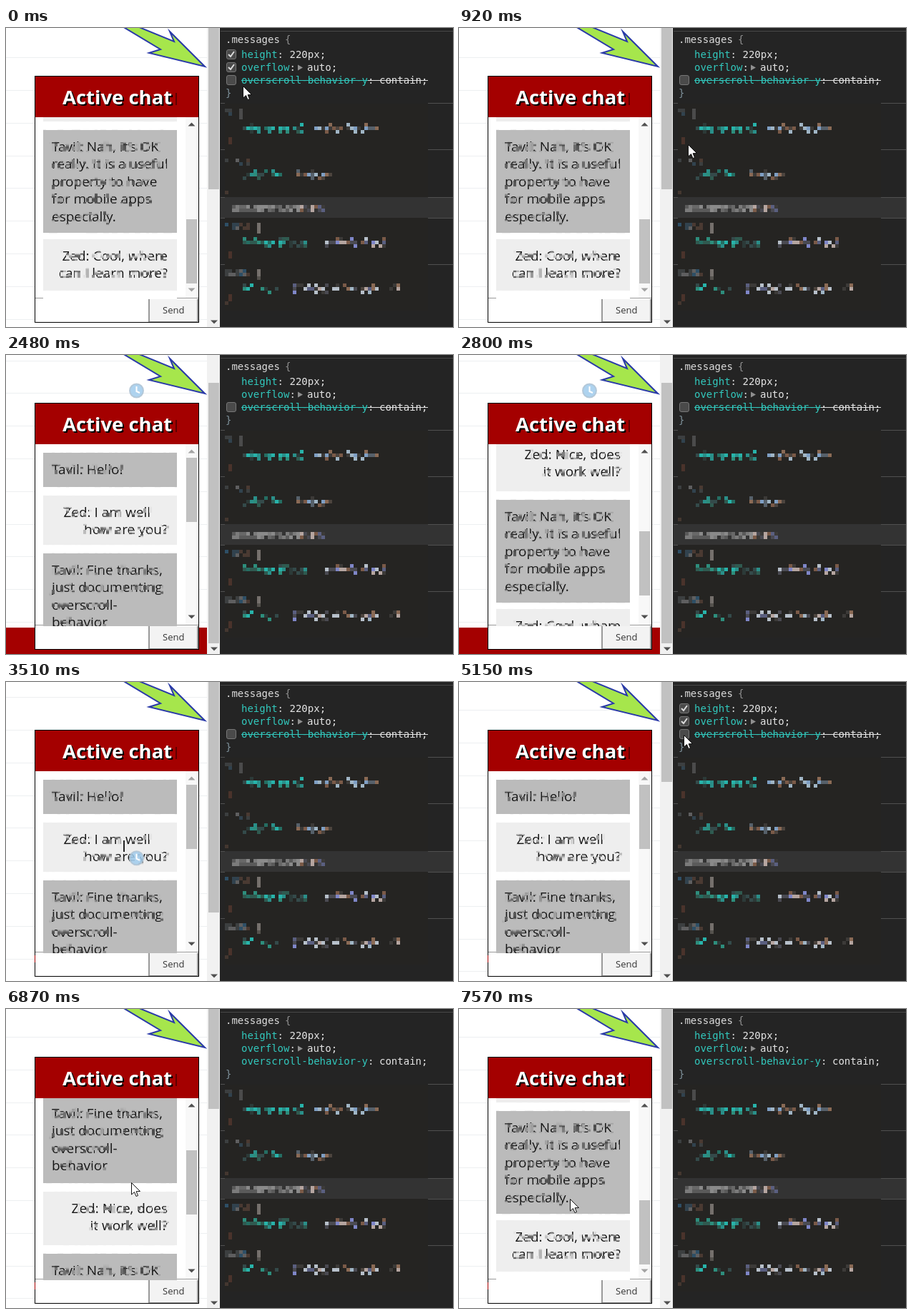
Animation of 625x419 px, one loop 8 s. Source, as an HTML page with a canvas:

```html
<!DOCTYPE html>
<html lang="en">
<head>
<meta charset="utf-8">
<title>Scroll chaining demo</title>
<style>
html, body { margin: 0; width: 100%; height: 100%; overflow: hidden; background: #fff; }
canvas { display: block; }
</style>
</head>
<body>
<canvas id="stage" width="625" height="419"></canvas>
<script>
const LOOP = 8000;
const ctx = document.getElementById('stage').getContext('2d');
const SANS = '"Open Sans", "Noto Sans", sans-serif';
const MONO = '14px "DejaVu Sans Mono", "Noto Sans Mono", monospace';
const RED = '#a40000', TEAL = '#32c8bd';

// Keyframes: [time, value, ...]
const PAGE = [[1160, 181], [1840, 581, 'out'], [3350, 581], [3670, 190], [3760, 190], [3990, 0], [5700, 0]];
const CHAT = [[1940, 355], [2480, 0], [2560, 0], [2850, 355], [2900, 355], [3200, 0], [6740, 0], [7040, 355]];
const POINTER = [
  [60, 331, 82], [230, 411, 66], [330, 411, 70], [1150, 285, 200], [1200, 280, 204],
  [1700, 161, 267], [3760, 165, 230], [4250, 353, 20], [4590, 340, 128], [4640, 340, 128],
  [5000, 316, 80], [5080, 316, 80], [5150, 314, 75], [5640, 314, 75], [5860, 446, 72],
  [6030, 378, 74], [6100, 378, 74], [6170, 330, 120], [6250, 268, 182], [6570, 179, 237],
  [6740, 179, 237], [7040, 170, 252], [7130, 170, 252], [7570, 155, 267]
];

// Chat bubbles in content coordinates: top, height, fill, side, lines
const BUBBLES = [
  [12, 48, '#bbb', 'left', ['Tavil: Hello!']],
  [72, 69, '#eee', 'right', ['Zed: I am well  ', 'how are you?']],
  [153, 121, '#bbb', 'left', ['Tavil: Fine thanks,', 'just documenting', 'overscroll-', 'behavior']],
  [286, 75, '#eee', 'right', ['Zed: Nice, does', 'it work well?']],
  [373, 144, '#bbb', 'left', ['Tavil: Nah, it\u2019s OK', 'really. It is a useful', 'property to have', 'for mobile apps', 'especially.']],
  [526, 72, '#eee', 'right', ['Zed: Cool, where', 'can I learn more?']]
];

function seeded(seed) {
  return () => {
    seed = (seed * 1664525 + 1013904223) % 4294967296;
    return seed / 4294967296;
  };
}

function layer(w, h) {
  const c = document.createElement('canvas');
  c.width = w;
  c.height = h;
  return c.getContext('2d');
}

function track(keys, t) {
  if (t <= keys[0][0]) return keys[0].slice(1);
  for (let i = 1; i < keys.length; i++) {
    const a = keys[i - 1], b = keys[i];
    if (t < b[0]) {
      let u = (t - a[0]) / (b[0] - a[0]);
      if (b[2] === 'out') u = 1 - (1 - u) ** 2;
      return b.slice(1).map((v, k) => typeof v === 'number' ? a[k + 1] + (v - a[k + 1]) * u : v);
    }
  }
  return keys[keys.length - 1].slice(1);
}

function box(x, y, w, h, fill, g = ctx) {
  g.fillStyle = fill;
  g.fillRect(x, y, w, h);
}

function label(str, x, y, fill, font, g = ctx) {
  g.font = font;
  g.fillStyle = fill;
  g.fillText(str, x, y);
}

function polygon(points, fill, stroke, width, x = 0, y = 0) {
  ctx.beginPath();
  points.forEach(([px, py]) => ctx.lineTo(x + px, y + py));
  ctx.closePath();
  ctx.fillStyle = fill;
  ctx.fill();
  if (stroke) {
    ctx.strokeStyle = stroke;
    ctx.lineWidth = width;
    ctx.stroke();
  }
}

function buildBubbles() {
  const W = 187, H = 610, CELL = 4;
  const plain = layer(W, H), squashed = layer(Math.ceil(W / CELL), H), rand = seeded(11);
  for (const [top, h, fill, side, lines] of BUBBLES) {
    box(0, top, W, h, fill, plain);
    plain.textAlign = side;
    lines.forEach((line, i) => {
      const dx = line.endsWith(' ') ? 24 : 0;
      label(line.trim(), side === 'left' ? 12 : 174 - dx, top + 30 + i * 24.4, '#161616', '19px ' + SANS, plain);
    });
  }
  // Some cells are blurred sideways into their average
  squashed.imageSmoothingQuality = 'high';
  squashed.drawImage(plain.canvas, 0, 0, W / CELL, H);
  plain.imageSmoothingEnabled = false;
  for (let y = 0; y < H; y += 6) {
    for (let x = 0; x < W; x += CELL) {
      if (rand() < 0.4) plain.drawImage(squashed.canvas, x / CELL, y, 1, 6, x, y, CELL, 6);
    }
  }
  return plain.canvas;
}

function buildPanel() {
  const g = layer(326, 419), rand = seeded(5);
  g.translate(-299, 0);
  box(299, 0, 326, 419, '#242424', g);
  box(300, 4, 325, 1, '#484848', g);
  box(306, 106, 284, 290, '#252422', g);
  box(300, 237, 325, 29, '#333333', g);
  for (const y of [105, 170, 237, 266, 331]) {
    box(300, y, 6, 1, '#505050', g);
    box(590, y, 35, 1, '#505050', g);
  }
  const teal = ['#28b3aa', '#2a8f89', '#256d62', '#2f5a50', '#2d8d7c', '#344a4a', '#2c3a38'];
  const value = ['#7f9fc4', '#a0b5c5', '#7a5a48', '#4c443e', '#8a6a55', '#56606a', '#3c3a38'];
  const mixed = ['#7f86c8', '#b5a5a0', '#5a5f80', '#b7c0ca', '#7a5a48', '#4a4a52', '#3c3a38'];
  const rule = ['#2e4f66', '#3c3f40', '#31424e', '#4a3a32', '#5f5f60'];
  const grey = ['#686868', '#7b7b7b', '#5a5a5a', '#8a8a8a'];
  const cells = (x0, x1, y, density, colors) => density.forEach((d, row) => {
    for (let x = x0; x < x1; x += 5) {
      const c = colors[Math.floor(rand() * colors.length)];
      if (rand() < d) box(x, y + row * 5, 5, 5, c, g);
    }
  });
  const PROP = [0.15, 0.7, 0.3];
  cells(306, 316, 113, [0.9, 0.3], rule);
  cells(326, 331, 113, [1, 1, 1], ['#4b4b4b', '#5f5f5f']);
  cells(331, 416, 133, PROP, teal);
  cells(431, 521, 133, PROP, value);
  cells(311, 316, 153, [1, 1], ['#4a332b']);
  cells(306, 346, 183, [0.5, 0.2], rule);
  cells(331, 386, 198, [0.3, 0.8, 0.4], teal);
  cells(406, 456, 198, PROP, value);
  cells(306, 311, 223, [0, 1], ['#443730']);
  cells(316, 411, 248, [0.85, 0.8], grey);
  cells(411, 446, 248, [0.9, 0.9], mixed);
  cells(306, 341, 273, [0.7, 0.55], rule);
  cells(351, 356, 273, [1, 1, 1], ['#55524e', '#75706c']);
  cells(331, 421, 293, [0.3, 0.8, 0.3], teal);
  cells(441, 531, 293, [0.3, 0.75, 0.3], mixed);
  cells(311, 316, 313, [1, 1], ['#4a332b']);
  cells(306, 341, 338, [0.45, 0.8], rule);
  cells(351, 356, 338, [1, 1, 1], ['#55524e', '#75706c']);
  cells(331, 381, 358, [0.1, 0.75, 0.3], teal);
  cells(401, 451, 358, [0.4, 0.85, 0.4], mixed);
  cells(456, 556, 358, [0.25, 0.75, 0.3], value.concat(mixed));
  cells(311, 316, 373, [1, 1], ['#4a332b']);
  cells(306, 311, 383, [1, 0], ['#443730']);
  return g.canvas;
}

const bubbles = buildBubbles();
const panel = buildPanel();

function caret(x, y, dir, fill) {
  polygon([[-5, -2.5 * dir], [5, -2.5 * dir], [0, 2.5 * dir]], fill, null, 0, x, y);
}

function drawPage(scroll, hover) {
  box(0, 0, 300, 419, '#fff');
  const gap = 45.8;
  for (let y = ((39 - scroll) % gap + gap) % gap; y < 419; y += gap) {
    box(0, Math.round(y), 282, 1, '#edeff1');
  }
  box(0, Math.round(963 - scroll), 282, 600, RED);
  box(281, 0, 18, 419, '#f1f1f1');
  const end = Math.round(140 + scroll / 2.1);
  box(283, end - 378, 15, 378, hover ? '#a8a8a8' : '#c1c1c1');
  box(281, 404, 18, 15, '#f1f1f1');
  caret(291, 412, 1, '#505050');
}

function drawChat(scroll, hover, t) {
  box(40, 67, 230, 346, '#000');
  box(41, 68, 228, 344, '#fff');
  box(41, 68, 228, 57, RED);
  const font = 'bold 27.5px ' + SANS;
  label('Active chat', 81, 109, '#000', font);
  label('Active chat', 80, 108, '#000', font);
  label('Active chat', 79, 107, '#fff', font);
  box(237, 91, 2, 17, '#600000');

  box(41, 378, 228, 1, '#999');
  ctx.save();
  ctx.beginPath();
  ctx.rect(52, 125, 187, 255);
  ctx.clip();
  box(52, 125, 187, 255, '#fff');
  ctx.drawImage(bubbles, 52, Math.round(125 - scroll));
  ctx.restore();

  box(251, 125, 17, 253, '#f8f8f8');
  box(252, Math.round(144 + scroll * 124 / 355), 15, 90, hover ? '#a8a8a8' : '#c1c1c1');
  caret(259.5, 135, -1, scroll < 1 ? '#a3a3a3' : '#505050');
  caret(259.5, 367, 1, scroll > 354 ? '#a3a3a3' : '#505050');

  box(199, 380, 70, 32, '#999');
  box(201, 380, 66, 31, '#f3f3f3');
  label('Send', 219, 400, '#333', '13px ' + SANS);
  if (t >= 3430) box(40, 383, 1, 10, RED);
}

function drawClock(y) {
  ctx.lineWidth = 2;
  ctx.fillStyle = 'rgba(160,203,236,.85)';
  ctx.strokeStyle = 'rgba(175,195,212,.85)';
  ctx.beginPath();
  ctx.arc(182.5, y, 9.5, 0, 7);
  ctx.fill();
  ctx.stroke();
  ctx.strokeStyle = '#fff';
  ctx.beginPath();
  ctx.moveTo(182.5, y - 6);
  ctx.lineTo(182.5, y + 1);
  ctx.lineTo(187, y + 3);
  ctx.stroke();
}

function checkbox(y, checked) {
  ctx.beginPath();
  ctx.roundRect(308.5, y - 6.5, 13, 13, 2.5);
  ctx.fillStyle = '#4a4a4a';
  ctx.fill();
  ctx.strokeStyle = '#777';
  ctx.lineWidth = 1;
  ctx.stroke();
  if (!checked) return;
  ctx.strokeStyle = '#dcdcdc';
  ctx.lineWidth = 2;
  ctx.beginPath();
  ctx.moveTo(311, y);
  ctx.lineTo(314, y + 3);
  ctx.lineTo(319, y - 4);
  ctx.stroke();
}

function declaration(prop, value, valueX, y) {
  label(prop, 329, y, TEAL, MONO);
  label(':', 329 + ctx.measureText(prop).width, y, '#d8d8d8', MONO);
  label(value, valueX, y, '#e4e4e4', MONO);
}

function drawPanel(enabled, hover) {
  ctx.drawImage(panel, 299, 0);
  label('.messages', 307, 21, '#dcdcdc', MONO);
  label('{', 390, 21, '#8f8f8f', MONO);
  declaration('height', '220px;', 396.5, 42);
  declaration('overflow', 'auto;', 421, 60);
  polygon([[408, 51.5], [415, 55.5], [408, 59.5]], '#8f8f8f');
  declaration('overscroll-behavior-y', 'contain;', 522, 78);
  label('}', 307, 96, '#7f929c', MONO);
  if (hover) {
    checkbox(37, true);
    checkbox(55, true);
  }
  if (!enabled) {
    box(329, 73, 177, 1, TEAL);
    box(506, 73, 84, 1, '#e4e4e4');
  }
  if (hover || !enabled) checkbox(73, enabled);
}

function drawPointer(x, y, beam) {
  if (beam) {
    box(x - 1, y - 8, 2, 16, '#222');
    return;
  }
  polygon([[0, 0], [0, 16.5], [4, 13], [6.5, 19], [9, 18], [6.6, 12.2], [12, 12]], '#fff', '#111', 1, x + 0.5, y - 0.5);
}

function draw(t) {
  const [pageY] = track(PAGE, t);
  const [chatY] = track(CHAT, t);
  const hidden = t >= 2010 && t < 3430;
  const beam = t >= 3430 && t < 3830;
  const [x, y] = track(POINTER, beam ? 3760 : t);

  drawPage(pageY, !hidden && x >= 282 && x < 298 && y < 140 + pageY / 2.1);
  drawChat(chatY, !hidden && x >= 250 && x < 270 && y > 144 && y < 234, t);
  drawClock(631 - pageY);
  polygon([[163, -2], [216, 30], [200, 35], [278, 54], [229, 5], [235, 19], [184, -2]], '#a6e64c', '#2a3aa8', 2);
  drawPanel(t >= 5470, x > 300 && y < 104 && !hidden);
  if (t >= 5320 && t < 5470) {
    ctx.fillStyle = 'rgba(255,255,0,.35)';
    ctx.beginPath();
    ctx.arc(315, 74, 27, 0, 7);
    ctx.fill();
  }
  if (!hidden) drawPointer(Math.round(x), Math.round(y), beam);
}

const start = performance.now();
function tick() {
  draw((performance.now() - start) % LOOP);
  requestAnimationFrame(tick);
}
tick();
</script>
</body>
</html>
```
